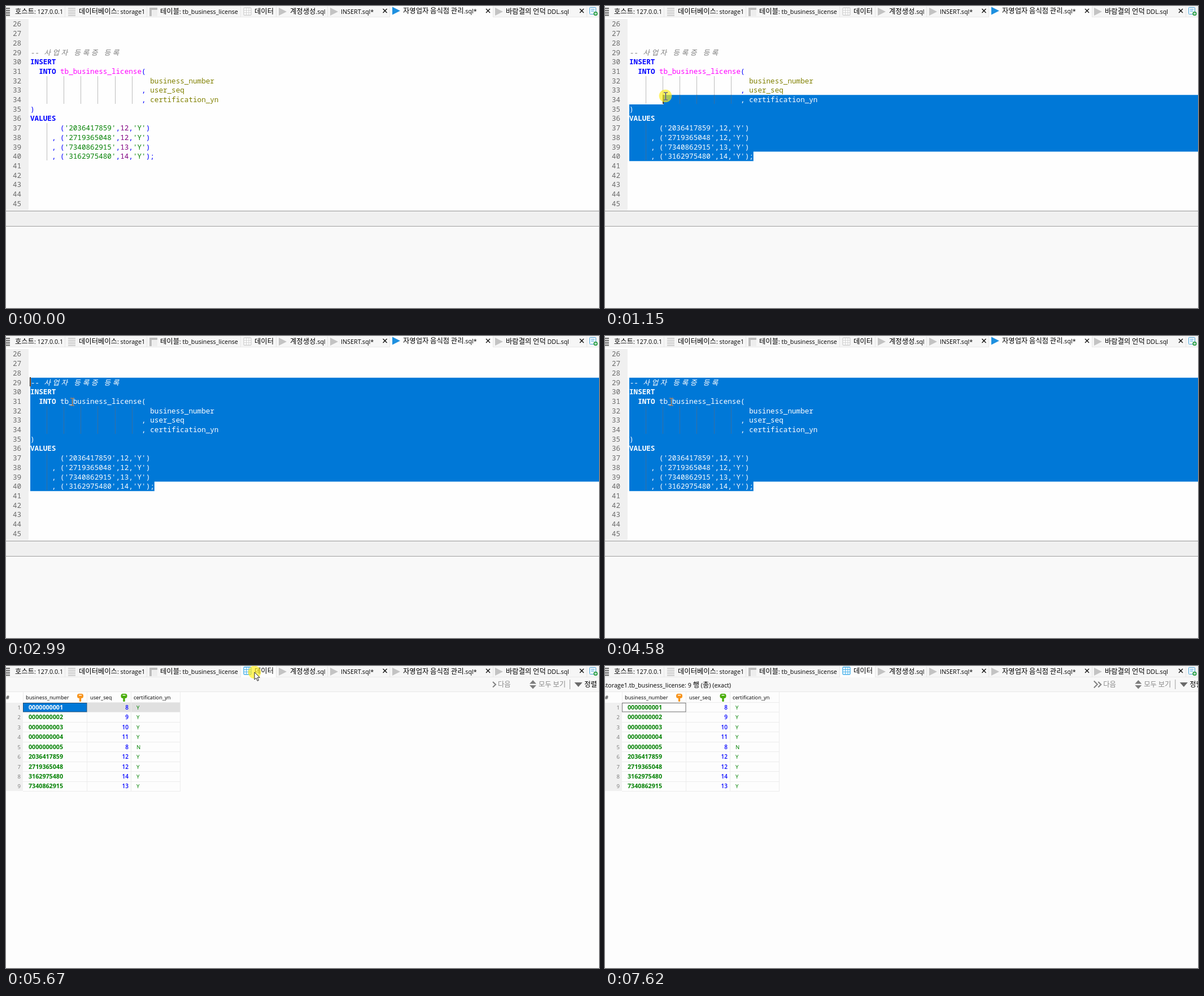
An HTML page that plays this animation: 1050x534 px, repeating every 8.95 s.

```html
<!DOCTYPE html>
<html lang="ko">
<head>
<meta charset="utf-8">
<title>SQL editor</title>
<style>
html, body { margin: 0; width: 100%; height: 100%; overflow: hidden; background: #fff; }
svg { display: block; width: 1050px; height: 534px; }
text { font-family: "Open Sans", "Noto Sans CJK KR", "Noto Sans CJK", sans-serif; }
.ko { font-family: "Noto Sans CJK KR", "Noto Sans CJK", sans-serif; font-size: 12.3px; }
.code { font: 12.63px "Noto Sans Mono", "Noto Sans CJK KR", "Noto Sans CJK", monospace; }
.bold { font-weight: 700; }
.note { font-style: italic; }
.invert { mix-blend-mode: difference; }
</style>
</head>
<body>
<svg id="stage" viewBox="0 0 1050 534"></svg>
<script>
const LOOP = 8950, CHAR = 7.58, PITCH = 16.7, LEFT = 43, FIRST = 26;
const LAST = 40, LAST_COL = 29;
const BLUE = '#0000ff', GREEN = '#008000', OLIVE = '#808000', SELECT = '#0078d7';
const ids = ['2036417859', '2719365048', '7340862915', '3162975480'];
const owners = [12, 12, 13, 14];
const database = 'storage1';

const colX = col => LEFT + col * CHAR;
const lineTop = line => 23.7 + (line - FIRST) * PITCH;
const rect = (x, y, w, h, fill, more = '') =>
  `<rect x="${x}" y="${y}" width="${w}" height="${h}" fill="${fill}" ${more}/>`;
const path = (d, fill, more = '') => `<path d="${d}" fill="${fill}" ${more}/>`;
const stroke = (d, color, width = 1, more = '') =>
  path(d, 'none', `stroke="${color}" stroke-width="${width}" ${more}`);
const label = (x, y, s, fill = '#000', size = 10.75, more = '') =>
  `<text x="${x}" y="${y}" fill="${fill}" font-size="${size}" ${more}>` +
  s.replace(/[가-힣]+/g, '<tspan class="ko">$&</tspan>') + '</text>';

// Tab bar
const triangle = (x, id = '') => path(`M${x} 3L${x + 14} 10L${x} 17Z`, '#c3c3c3', id);
const closeMark = x => stroke(`M${x - 3.5} 5l7 7m0 -7l-7 7`, '#111', 1.4);

function tabBar() {
  const bars = (x, w) => [3, 7, 11, 15].map(y => rect(x, y, w, 3, '#d5d5d5')).join('');
  const separators = [104, 249, 415, 478, 569, 679, 862, 1028]
    .map(x => rect(x, 1, 1, 18, '#e6e6e6')).join('');
  return rect(0, 0, 1050, 20, '#f6f6f6') + rect(0, 19, 1050, 1, '#e9e9e9') +
    rect(680, 0, 182, 20, '#fdfdfd', 'id="sqlBack"') +
    rect(416, 0, 62, 20, '#fdfdfd', 'id="dataBack"') + separators +
    [3, 7, 11, 15].map(y => rect(0, y, 7, 2.5, '#777')).join('') +
    bars(110, 13) +
    rect(254, 3, 14, 4, '#bcbcbc') + rect(254, 7, 4, 11, '#bcbcbc') +
    rect(259, 8, 9, 10, '#ededed') +
    `<g id="grid" fill="#fff" stroke="#d0d0d0"><rect x="421" y="2.5" width="13" height="13" rx="1.5" stroke-width="1.4"/>
      <path d="M425.5 3v12M430 3v12M421 7h13M421 11h13"/></g>` +
    triangle(483) + triangle(574) + triangle(684, 'id="sqlIcon"') + triangle(866) +
    label(16, 14, '호스트: 127.0.0.1') + label(129, 14, '데이터베이스: ' + database) +
    label(273, 14, '테이블: tb_business_license') +
    label(440, 14, '데이터', '#000', 10.75, 'id="dataName"') +
    label(503, 14, '계정생성.sql') + label(593, 14, 'INSERT.sql*') +
    label(703, 14, '자영업자 음식점 관리.sql*', '#000', 10.75, 'id="sqlName"') +
    label(885, 14, '바람결의 언덕 DDL.sql') + [671, 853.5, 1019.5].map(closeMark).join('') +
    rect(1033.5, 2.5, 11, 12, '#eef8fe', 'stroke="#4ba3d8" rx="1"') +
    stroke('M1036 6h6M1036 9h5', '#4ba3d8') +
    '<circle cx="1044" cy="13.5" r="3.8" fill="#3aa655"/>' + stroke('M1042 13.5h4m-2 -2v4', '#fff');
}

// SQL editor
const run = (line, col, text, fill, cls = '') => ({ line, col, text, fill, cls });
const code = [
  run(29, 0, '--', '#808080', 'note'),
  ...[...'사업자 등록증 등록'].reduce((out, ch) => {
    if (ch !== ' ') out.list.push(run(29, out.col + .2, ch, '#808080', 'note'));
    out.col += ch === ' ' ? 1 : 2;
    return out;
  }, { col: 3, list: [] }).list,
  run(30, 0, 'INSERT', BLUE, 'bold'), run(31, 2, 'INTO', BLUE, 'bold'),
  run(31, 7, 'tb_business_license', '#ff00ff'), run(31, 26, '(', BLUE),
  run(32, 28, 'business_number', OLIVE),
  run(33, 26, ',', BLUE), run(33, 28, 'user_seq', OLIVE),
  run(34, 26, ',', BLUE), run(34, 28, 'certification_yn', OLIVE),
  run(35, 0, ')', BLUE), run(36, 0, 'VALUES', BLUE, 'bold'),
  ...ids.flatMap((id, i) => {
    const line = 37 + i;
    return [
      ...(i ? [run(line, 5, ',', BLUE)] : []),
      run(line, 7, '(', BLUE), run(line, 8, `'${id}'`, GREEN), run(line, 20, ',', BLUE),
      run(line, 21, String(owners[i]), '#800080'), run(line, 23, ',', BLUE),
      run(line, 24, "'Y'", GREEN), run(line, 27, i === 3 ? ');' : ')', BLUE)
    ];
  })
];
const drawCode = fill => code.map(r =>
  `<text class="code ${r.cls}" x="${colX(r.col)}" y="${lineTop(r.line) + 12.7}" fill="${fill || r.fill}">${r.text}</text>`
).join('');
const guides = color => stroke(
  [0, 1, 2, 3, 4, 5].map(i => `M${Math.floor(72 + i * 30.3) + .5} 124V173`).join('') + 'M72.5 207V273', color);

function editor() {
  const numbers = Array.from({ length: 20 }, (_, i) =>
    `<text class="code" x="12" y="${lineTop(FIRST + i) + 12.7}" fill="#6b6b6b">${FIRST + i}</text>`).join('');
  return rect(0, 20, 1050, 342, '#fefefe') + rect(0, 23, 40, 338, '#f0f0f0') + numbers +
    rect(0, 362, 1050, 1, '#969696') + rect(0, 363, 1050, 26, '#f0f0f0') +
    rect(0, 389, 1050, 1, '#a0a0a0') + rect(0, 390, 1050, 144, '#f9f9f9') +
    guides('#bdbdbd') + drawCode() + path('', SELECT, 'id="selection"') +
    `<g clip-path="url(#selected)">${guides('#3a6f9f')}${drawCode('#fff')}</g>` +
    rect(0, 45, 1050, 1, '#e8e8e8', 'id="toolLine"') +
    rect(0, 0, 2, 16, '#fff', 'id="caret" class="invert"');
}

// Data grid
const rows = [
  ...[8, 9, 10, 11, 8].map((seq, i) => ['000000000' + (i + 1), seq, i === 4 ? 'N' : 'Y']),
  ...ids.map((id, i) => [id, owners[i], 'Y']).sort((a, b) => a[0].localeCompare(b[0]))
];
const key = (x, color) => rect(x - 5.5, 49, 11, 8, color, 'rx="3.5"') +
  rect(x - 1.7, 56, 3.4, 7, color, 'rx="1"') + rect(x - 2.5, 51, 5, 1.4, '#fff');

function dataView() {
  const step = 17.45;
  const cells = rows.map(([id, seq, yn], i) => {
    const y = 76.8 + i * step;
    return label(26, y, String(i + 1), '#777', 9.5, 'text-anchor="end"') +
      label(40, y, id, GREEN, 10.7, `class="bold" ${i ? '' : 'id="firstId"'}`) +
      label(217, y, String(seq), BLUE, 10, 'font-weight="600" text-anchor="end"') +
      label(231, y, yn, GREEN, 9.6);
  }).join('');
  let lines = 'M30.5 46V64M143.5 46V221M221.5 46V221M308.5 46V221';
  for (let i = 0; i <= 9; i++) lines += `M30 ${Math.round(64 + i * step) + .5}H309`;
  return rect(0, 20, 1050, 514, '#fdfdfd') + rect(0, 20, 1050, 25, '#f8f8f8') +
    rect(0, 45, 1050, 1, '#e8e8e8') + rect(0, 65, 30, 156, '#f0f0f0') +
    rect(144, 65, 165, 16, '#e0e0e0', 'id="rowBack"') + stroke(lines, '#ececec') +
    rect(30.5, 65.5, 112.5, 15.5, SELECT, 'id="cell"') +
    label(0, 58.5, '#', '#000', 9.25) + label(35, 58.5, 'business_number', '#000', 9.25) +
    label(149, 58.5, 'user_seq', '#000', 9.25) + label(226, 58.5, 'certification_yn', '#000', 9.25) +
    key(131.5, '#f7941d') + key(209, '#4aae0c') + cells +
    label(223, 38, database + '.tb_business_license: 9 행 (총) (exact)', '#000', 10.75,
      'id="summary" text-anchor="end"') +
    `<g id="tools">` + stroke('M862 28l5 4.7l-5 4.7', '#808080', 2) +
    stroke('M854.5 26.5l6 6l-6 6', '#808080', 2, 'id="chevron"') +
    label(871, 37, '다음', '#8a8a8a') + path('M927 31.5l6 -6.5l6 6.5zM927 34l6 6.5l6 -6.5z', '#7d7d7d') +
    label(943, 37, '모두 보기', '#8a8a8a') + rect(998, 24, 1, 17, '#a0a0a0') +
    path('M1006.5 29h14l-7 8z', '#6a6a6a') + label(1024, 37, '정렬') + '</g>';
}

const stage = document.getElementById('stage');
stage.innerHTML = `<defs><clipPath id="selected"><path id="clipShape"/></clipPath></defs>` +
  rect(0, 0, 1050, 534, '#fff') + `<g id="editor">${editor()}</g><g id="data">${dataView()}</g>` +
  tabBar() +
  `<circle id="press" r="11.3" fill="#ffee1a" opacity=".68"/>
  <path id="beam" class="invert" d="M-3.5 -6.5h2.5q1 0 1 1v11q0 1 -1 1h-2.5M3.5 -6.5h-2.5q-1 0 -1 1v11q0 1 1 1h2.5" fill="none" stroke="#fff"/>
  <path id="arrow" d="M0 0V13L3 10.2L5.2 15.3L7.4 14.3L5.2 9.3H9.3Z" fill="#fff" stroke="#222" stroke-width="1"/>`;
const el = Object.fromEntries([...stage.querySelectorAll('[id]')].map(n => [n.id, n]));

// Pointer route: time, x, y
const route = [
  [70, 992, 519], [280, 830, 425], [520, 460, 322], [740, 245, 272], [870, 266, 267], [1010, 260, 266],
  [1080, 196, 226], [1150, 107, 159], [1290, 72, 122], [1430, 57, 102], [1640, 49, 88], [1840, 43, 83],
  [2220, 43, 82], [2450, 117, 116], [4750, 117, 116], [5050, 260, 78], [5350, 415, 28], [5510, 440, 11],
  [6030, 440, 11], [6300, 475, 140], [6610, 470, 308], [6980, 470, 308], [7080, 450, 315],
  [7200, 369, 292], [7280, 382, 267], [7460, 382, 267], [7560, 398, 275]
];
function pointerAt(t) {
  const i = route.findIndex(p => p[0] > t);
  if (i === 0) return route[0].slice(1);
  if (i < 0) return route[route.length - 1].slice(1);
  const [a, b] = [route[i - 1], route[i]], k = (t - a[0]) / (b[0] - a[0]);
  return [a[1] + (b[1] - a[1]) * k, a[2] + (b[2] - a[2]) * k];
}

const show = (node, on) => node.setAttribute('display', on ? 'inline' : 'none');
const move = (node, x, y) => node.setAttribute('transform', `translate(${x} ${y})`);
const clamp = (v, lo, hi) => Math.min(hi, Math.max(lo, v));

function selectionShape(line, col) {
  const x = colX(col), end = colX(LAST_COL), top = lineTop(line), bottom = lineTop(LAST + 1);
  if (line === LAST) return col < LAST_COL ? `M${x} ${top}H${end}V${bottom}H${x}Z` : '';
  return `M${x} ${top}H1050V${lineTop(LAST)}H${end}V${bottom}H${LEFT}V${top + PITCH}H${x}Z`;
}

function render(t) {
  const tick = Math.floor((t - 30) / 70) * 70 + 30;
  const [x, y] = pointerAt(tick);
  const onData = t >= 5670, dataTab = t >= 5580, loaded = t >= 5740, cleared = t >= 6750;

  show(el.editor, !onData);
  show(el.data, onData);
  show(el.toolLine, dataTab);
  show(el.sqlBack, !dataTab);
  show(el.dataBack, dataTab);
  el.sqlName.setAttribute('y', dataTab ? 14 : 12.8);
  el.dataName.setAttribute('y', dataTab ? 12.8 : 14);
  el.sqlIcon.setAttribute('fill', onData ? '#c3c3c3' : '#1e90e0');
  move(el.sqlIcon, 0, onData ? 0 : -1.5);
  el.grid.setAttribute('stroke', onData ? '#45b0ea' : '#d0d0d0');
  move(el.grid, 0, dataTab ? -.5 : .8);

  const dragged = t < 1840 ? [x, y] : [LEFT, 82];
  const line = clamp(FIRST + Math.floor((dragged[1] - 23.7) / PITCH), 29, LAST);
  const col = t < 1010 ? LAST_COL : clamp(Math.round((dragged[0] - LEFT) / CHAR), 0, LAST_COL);
  const shape = t < 1010 ? '' : selectionShape(line, col);
  el.selection.setAttribute('d', shape);
  el.clipShape.setAttribute('d', shape);
  move(el.caret, Math.floor(colX(col)) - 1, Math.round(lineTop(line)) - (line === 29 ? 1 : 0));
  show(el.caret, t >= 940 && (t < 2460 || Math.floor((t - 2460) / 530) % 2 === 1));

  show(el.summary, loaded);
  show(el.chevron, loaded);
  move(el.tools, loaded ? 11.3 : 0, 0);
  show(el.rowBack, !cleared);
  el.cell.setAttribute('fill', cleared ? '#fdfdfd' : SELECT);
  el.cell.setAttribute('stroke', cleared ? '#777' : '#20527c');
  el.firstId.setAttribute('fill', cleared ? GREEN : '#fff');

  const visible = t >= 70 && t < 7620;
  const textArea = !dataTab && y > 22 && y < 361;
  const pressed = (t >= 940 && t < 2110) || (onData && !loaded) || (t >= 6750 && t < 6880);
  show(el.beam, visible && textArea);
  show(el.arrow, visible && !textArea);
  show(el.press, pressed);
  move(el.beam, Math.round(x) + .5, Math.round(y) + .5);
  move(el.arrow, x, y);
  move(el.press, x, y);
}

const start = performance.now();
function frame() {
  render((performance.now() - start) % LOOP);
  requestAnimationFrame(frame);
}
frame();
</script>
</body>
</html>
```
